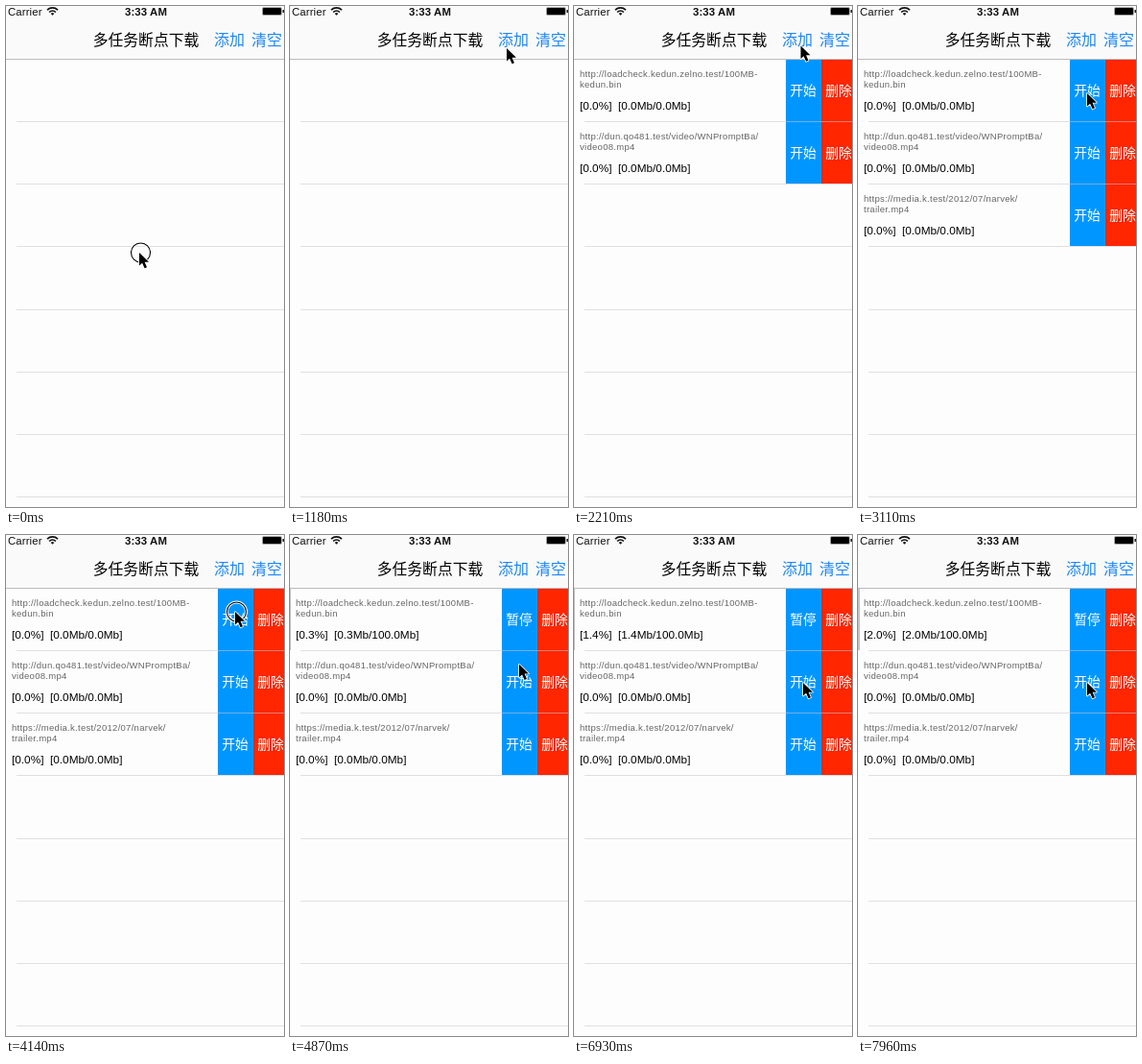
An HTML page that plays this animation: 290 by 522 pixels, repeating every 8000 ms.

```html
<!DOCTYPE html>
<html lang="zh">
<head>
<meta charset="utf-8">
<title>多任务断点下载</title>
<style>
  html, body { margin: 0; width: 100%; height: 100%; overflow: hidden; background: #fdfdfd; }
  svg { display: block; width: 290px; height: 522px; }
  text { font-family: "Liberation Sans", Arial, sans-serif; }
  .cjk { font-family: "Noto Sans CJK SC", "Noto Sans CJK", "Noto Sans CJK JP", sans-serif; }
  .mid { text-anchor: middle; }
  .title { font-size: 15.8px; font-weight: 500; fill: #000; }
  .link { font-size: 16px; fill: #1d86f7; }
  .bar { font-size: 11.4px; fill: #111; letter-spacing: .01em; }
  .url { font-size: 9.5px; fill: #666; letter-spacing: .03em; }
  .info { font-size: 11.8px; fill: #000; }
  .btn { font-size: 13.8px; font-weight: 500; fill: #fff; }
</style>
</head>
<body>
<svg id="stage" viewBox="0 0 290 522">
  <rect width="290" height="522" fill="#fdfdfd"/>
  <g id="rows"></g>
  <g id="lines" fill="#c8c7cc" fill-opacity=".55"></g>

  <rect width="290" height="55" fill="#fafafa"/>
  <rect y="55" width="290" height="1" fill="#bcbcbc"/>
  <text class="bar" x="2" y="9.6">Carrier</text>
  <g fill="none" stroke="#111" stroke-width="1.7">
    <path d="M43 4.2A7.9 7.9 0 0 1 54 4.2"/>
    <path d="M45.1 6.5A4.9 4.9 0 0 1 51.9 6.5"/>
    <path d="M48.5 9.8L46.7 8A2.5 2.5 0 0 1 50.3 8Z" fill="#111" stroke="none"/>
  </g>
  <text class="bar mid" x="146" y="9.6" font-weight="700">3:33 AM</text>
  <rect x="267.5" y="1.5" width="20" height="8" rx="1.5" stroke="#aaa"/>
  <rect x="288.5" y="4" width="1.5" height="3" fill="#222"/>
  <text class="cjk title mid" x="146" y="41">多任务断点下载</text>
  <text class="cjk link mid" x="233" y="41">添加</text>
  <text class="cjk link mid" x="272" y="41">清空</text>

  <g id="cursor">
    <g id="ring" fill="none">
      <circle cx="1.5" r="10" stroke="#fff" stroke-width="3"/>
      <circle cx="1.5" r="10" stroke="#000" stroke-width="1.1"/>
    </g>
    <path d="M0 0V13.6L3.1 10.7L5.6 16.3L8 15.3L5.6 9.8H10Z"
      fill="#000" stroke="#fff" stroke-width="1.6" stroke-linejoin="round" paint-order="stroke"/>
  </g>
</svg>
<script>
const LOOP = 8000;
const STEP = 147.5;          // screen refresh interval
const TOP = 55.2, ROW = 65.2;
const NS = 'http://www.w3.org/2000/svg';
const byId = id => document.getElementById(id);
const rowTop = i => Math.floor(TOP + ROW * i);

// All moments below are counted in refresh steps.
const tasks = [
  { at: 10, url: ['http://loadcheck.kedun.zelno.test/100MB-', 'kedun.bin'] },
  { at: 14, url: ['http://dun.qo481.test/video/WNPromptBa/', 'video08.mp4'] },
  { at: 18, url: ['https://media.k.test/2012/07/narvek/', 'trailer.mp4'] }
];
const START = 29;
const ticks = [31, 32, 33, 34, 35, 36, 38, 39, 40, 42, 43, 45, 46, 47, 49, 50, 51, 52, 53, 54];
const presses = [[0, 0], [9, 10], [13, 14], [17, 18], [27, 28]];
const path = [
  [0, 139, 257], [1, 139, 257], [8, 226, 44], [9, 236.5, 41.5], [18, 236.5, 41.5],
  [21, 239, 91], [26, 239, 80], [29, 239, 80], [32, 239, 128], [35, 239, 154]
];

function add(parent, tag, attrs, text) {
  const el = document.createElementNS(NS, tag);
  for (const key in attrs) el.setAttribute(key, attrs[key]);
  if (text) el.textContent = text;
  parent.appendChild(el);
  return el;
}

for (let i = 1; i <= 7; i++) {
  add(byId('lines'), 'rect', { x: 11, y: rowTop(i), width: 279, height: 1 });
}

function buildRow(task, i) {
  const y = rowTop(i), height = rowTop(i + 1) - y;
  const g = task.g = add(byId('rows'), 'g', {});
  task.fill = add(g, 'rect', { x: 0, y, width: 0, height, fill: '#c6c6c6' });
  task.url.forEach((line, k) => add(g, 'text', { class: 'url', x: 6, y: y + 19 + 11 * k }, line));
  task.info = add(g, 'text', { class: 'info', x: 6, y: y + 53.2 });
  add(g, 'rect', { x: 221, y, width: 37, height, fill: '#0096ff' });
  add(g, 'rect', { x: 258, y, width: 32, height, fill: '#ff2600' });
  task.label = add(g, 'text', { class: 'cjk btn mid', x: 239, y: y + 38.4 }, '开始');
  add(g, 'text', { class: 'cjk btn mid', x: 276, y: y + 38.4 }, '删除');
}
tasks.forEach(buildRow);

function cursorAt(n) {
  const i = path.findIndex(p => p[0] > n);
  if (i < 0) return path[path.length - 1].slice(1);
  const [n0, x0, y0] = path[i - 1], [n1, x1, y1] = path[i];
  const u = (n - n0) / (n1 - n0), e = u * u * (3 - 2 * u);
  return [x0 + (x1 - x0) * e, y0 + (y1 - y0) * e];
}

const show = (el, on) => el.setAttribute('visibility', on ? 'visible' : 'hidden');

function render(ms) {
  const n = Math.floor((ms + 8) / STEP);
  const loaded = ticks.filter(k => k <= n).length / 10;

  tasks.forEach((task, i) => {
    const done = i ? 0 : loaded;
    const now = done.toFixed(1), total = done ? '100.0' : '0.0';
    show(task.g, n >= task.at);
    task.info.textContent = `[${now}%]\u00a0\u00a0[${now}Mb/${total}Mb]`;
    task.label.textContent = !i && n >= START ? '暂停' : '开始';
    task.fill.setAttribute('width', done ? Math.max(1, Math.round(done)) : 0);
  });

  byId('cursor').setAttribute('transform', `translate(${cursorAt(n)})`);
  show(byId('ring'), presses.some(([a, b]) => n >= a && n <= b));
}

const begin = performance.now();
function loop() {
  render((performance.now() - begin) % LOOP);
  requestAnimationFrame(loop);
}
loop();
</script>
</body>
</html>
```
